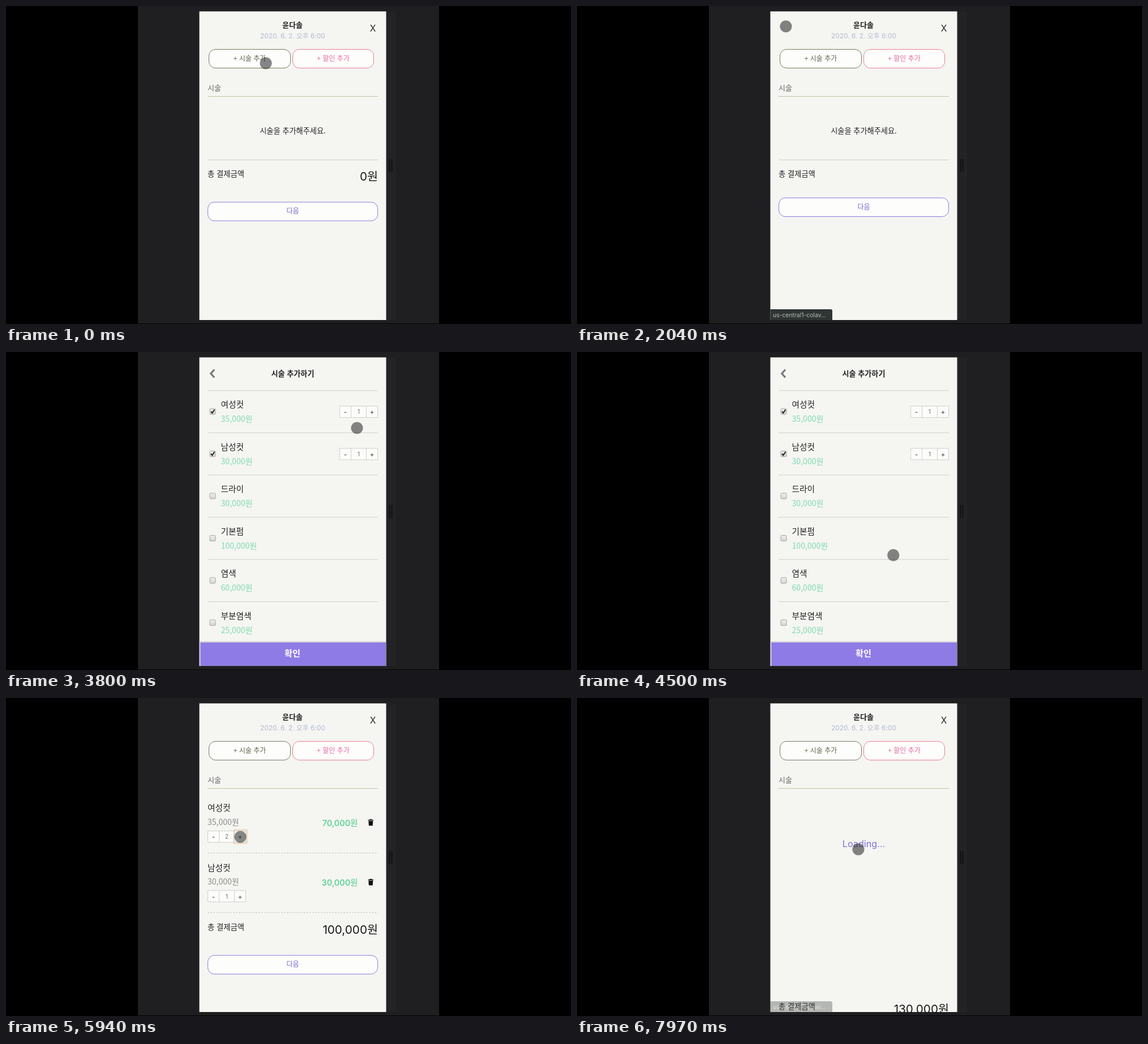
Animation, 998 px wide and 561 px high, one loop 8000 ms. Source, as an HTML page:

```html
<!DOCTYPE html>
<html lang="ko">
<head>
<meta charset="utf-8">
<title>시술 추가</title>
<style>
html, body { margin: 0; width: 100%; height: 100%; overflow: hidden; background: #000; }
svg { display: block; width: 100%; height: 100%; }
text { font-family: "Noto Sans CJK KR", "Noto Sans CJK", sans-serif; white-space: pre; }
.sf { font-family: Inter, "Noto Sans CJK KR", "Noto Sans CJK", sans-serif; }
</style>
</head>
<body>
<svg viewBox="0 0 998 561">
  <defs>
    <clipPath id="panel"><rect x="341.5" y="9.5" width="330" height="544.5"/></clipPath>
    <linearGradient id="box" x2="0" y2="1"><stop stop-color="#f0f0ee"/><stop offset="1" stop-color="#d4d4d2"/></linearGradient>
  </defs>
  <rect width="998" height="561"/>
  <rect x="233" width="532" height="560" fill="#1f1f21"/>
  <rect x="671" y="10" width="18" height="544" fill="#232325"/>
  <path d="M677.5 270v23M681.5 270v23" stroke="#111113" stroke-width="2"/>
  <rect x="341.5" y="9.5" width="330" height="544.5" fill="#f5f5f2"/>
  <g clip-path="url(#panel)">
    <g id="screen"></g>
    <g id="status">
      <path d="M341 535H448q3 0 3 3V554H341z" fill="#2f3533"/>
      <text class="sf" x="346" y="549" font-size="10.4" fill="#b9bcb9">us-central1-colav…</text>
    </g>
  </g>
  <circle id="cursor" r="10.6" fill="#202020" fill-opacity=".54"/>
</svg>
<script>
const LOOP = 8000, HOLD = 200, RESPONSE = 60, FADE = 90;
const ROW = 74.5, ITEM = 105.2;
const $ = id => document.getElementById(id);

const services = [['여성컷', 35000], ['남성컷', 30000], ['드라이', 30000],
  ['기본펌', 100000], ['염색', 60000], ['부분염색', 25000]];
const won = n => n.toLocaleString('en-US') + '원';

// cy is the optical middle of the line
const label = (s, x, cy, size, fill, { anchor = 'start', weight = 400, sf = false } = {}) =>
  `<text x="${x}" y="${cy + size * .37}" font-size="${size}" fill="${fill}" font-weight="${weight}"
    text-anchor="${anchor}"${sf ? ' class="sf"' : ''}>${s}</text>`;
const mid = { anchor: 'middle' };
const midSf = { anchor: 'middle', sf: true };
const right = { anchor: 'end', sf: true };

const rule = (y, color, extra = '') => `<path d="M356 ${y}H657" stroke="${color}" ${extra}/>`;

const pill = (x, y, w, s, border, color) =>
  `<rect x="${x + .5}" y="${y + .5}" width="${w - 1}" height="33" rx="11.5" fill="#fdfdfc" stroke="${border}"/>`
  + label(s, x + w / 2, y + 16.5, 12, color, mid);

const stepper = (x, y, n, focused) => `
  <rect x="${x + .5}" y="${y + .5}" width="67" height="20" fill="#fcfcfa" stroke="#cfcfca"/>
  <path d="M${x + 20.5} ${y}v21M${x + 47.5} ${y}v21" stroke="#cfcfca"/>`
  + label('-', x + 10.5, y + 11, 12, '#444', midSf)
  + label(n, x + 34, y + 10.5, 10.5, '#777', midSf)
  + label('+', x + 57.5, y + 11, 12, '#444', midSf)
  + (focused ? `<rect x="${x + 46.5}" y="${y - 1.5}" width="23" height="24" fill="none" stroke="#eecba6" stroke-width="1.5"/>` : '');

const checkbox = (cy, on) => `
  <rect x="360" y="${cy - 5}" width="10" height="10" rx="1.5" fill="url(#box)" stroke="#a3a3a1"/>`
  + (on ? `<path d="M362 ${cy}l2.3 2.6L368.5 ${cy - 3.5}" fill="none" stroke="#222" stroke-width="2"/>` : '');

const trash = cy => `
  <path d="M639.5 ${cy - 4}h9.5M642.5 ${cy - 5}h3.5" stroke="#111" stroke-width="1.6"/>
  <path d="M640.3 ${cy - 2.5}h8l-.6 8.2h-6.8z" fill="#111"/>`;

const list = (...counts) =>
  label('시술 추가하기', 506.5, 38.5, 13.1, '#222', { ...mid, weight: 700 })
  + '<path d="M368 31l-6.2 7 6.2 7" fill="none" stroke="#777" stroke-width="3.2"/>'
  + services.map(([name, price], i) => {
    const y = 68 + i * ROW;
    return rule(y, '#cfcfcb') + checkbox(y + 37, counts[i])
      + label(name, 379.5, y + 25, 14.7, '#222')
      + label(won(price), 379.5, y + 50, 14.1, '#7fdcae', { weight: 300 })
      + (counts[i] ? stepper(589, y + 27, counts[i]) : '');
  }).join('')
  + `<rect x="341" y="511" width="331" height="43" fill="#8f7be6"/>
     <path d="M342.5 554V511.5H671" fill="none" stroke="#d3cfd6" stroke-width="2"/>
     <path d="M344 553.5H670.5V513" fill="none" stroke="#8579ae"/>`
  + label('확인', 506, 531.5, 15.2, '#fff', { ...mid, weight: 700 });

// totalY places the block holding the sum and the next button
const receipt = (body, totalY, total) =>
  label('윤다솔', 506, 33, 13, '#222', { ...mid, weight: 700 })
  + label('2020. 6. 2. 오후 6:00', 506.5, 52.5, 11.9, '#b1b9d0', midSf)
  + label('X', 648, 39, 15.5, '#222', midSf)
  + pill(358, 76, 145, '+ 시술 추가', '#777b60', '#5f644a')
  + pill(506, 76, 144, '+ 할인 추가', '#ec7f92', '#e5689a')
  + label('시술', 356, 144, 13, '#666') + rule(159.5, '#bdc5a4') + body
  + label('총 결제금액', 356, totalY, 13.3, '#222')
  + (total == null ? '' : label(won(total), 657, totalY + 4, 20.7, '#181818', right))
  + pill(356, totalY + (total == null ? 42 : 49.5), 301, '다음', '#8a7cda', '#7565c8');

const empty = total => receipt(
  label('시술을 추가해주세요.', 506.5, 220, 13.2, '#222', mid) + rule(271.5, '#cdd3bd'), 296, total);

const loading = total => receipt(label('Loading...', 506.5, 257.5, 16.2, '#8470da', midSf), 544, total);

const items = (counts, focus) => {
  const rows = counts.map((n, i) => {
    const y = 194 + i * ITEM, [name, price] = services[i];
    return label(name, 356, y, 14.7, '#222')
      + label(won(price), 356, y + 24.5, 14, '#8b8b8b', { weight: 300 })
      + stepper(356, y + 40, n, focus === i)
      + label(won(price * n), 621.5, y + 26.5, 14.6, '#4bcf88', { ...right, weight: 500 })
      + trash(y + 25.5) + rule(y + 79.5, '#c3c3c6', 'stroke-dasharray="3 2"');
  });
  return receipt(rows.join(''), 404, counts.reduce((sum, n, i) => sum + n * services[i][1], 0));
};

const spot = {
  add: { x: 459, y: 101 },
  back: { x: 369, y: 36 },
  confirm: { x: 512, y: 530 },
  middle: { x: 497, y: 267 },
  counter: { x: 620, y: 134 },
  check: i => ({ x: 367, y: 109 + i * ROW }),
  plus: i => ({ x: 414, y: 245 + i * ITEM })
};

// "to" is where the pointer has arrived, "show" the view that answers
const script = [
  { at: 0, to: spot.add, show: empty(0) },
  { at: 300, show: list() },
  { at: 1050, to: spot.check(0), show: list(1) },
  { at: 1400, to: spot.check(1), show: list(1, 1) },
  { at: 1880, to: spot.back, show: empty() },
  { at: 2290, show: empty(0) },
  { at: 2500, to: spot.add },
  { at: 2790, show: list() },
  { at: 3100, to: spot.check(0), show: list(1) },
  { at: 3400, to: spot.check(1), show: list(1, 1) },
  { at: 3800, to: spot.counter },
  { at: 4920, to: spot.confirm, show: loading(0) },
  { at: 5420, show: items([1, 1]) },
  { at: 5830, to: spot.plus(0), show: items([2, 1], 0) },
  { at: 6200, to: spot.plus(1), show: items([2, 2], 1) },
  { at: 6740, to: spot.add },
  { at: 6900, show: list(2, 2) },
  { at: 7500, to: spot.confirm, show: loading(130000) },
  { at: 7970, to: spot.middle }
];
const moves = script.filter(s => s.to), views = script.filter(s => s.show);
const requests = [{ from: 1940, until: 2350 }, { from: 5200, until: 5480 }, { from: 7720, until: 7910 }];

const clamp = v => Math.min(1, Math.max(0, v));
const ease = k => k * k * (3 - 2 * k);

function pointer(t) {
  const i = moves.findLastIndex(m => m.at <= t);
  const a = moves[i], b = moves[i + 1] || a;
  const leave = a.at + HOLD;
  const k = t > leave ? ease(clamp((t - leave) / (b.at - leave))) : 0;
  return [a.to.x + (b.to.x - a.to.x) * k, a.to.y + (b.to.y - a.to.y) * k];
}

let shown;
function draw(t) {
  const view = views.findLast(v => v.at + RESPONSE <= t) || views[0];
  if (view != shown) {
    shown = view;
    $('screen').innerHTML = view.show;
  }
  const [x, y] = pointer(t);
  $('cursor').setAttribute('transform', `translate(${x} ${y})`);
  const glow = requests.map(r => clamp(Math.min((t - r.from) / FADE, 1 - (t - r.until) / FADE)));
  $('status').setAttribute('opacity', Math.max(...glow));
}

const start = performance.now();
function tick() {
  draw((performance.now() - start) % LOOP);
  requestAnimationFrame(tick);
}
tick();
</script>
</body>
</html>
```
